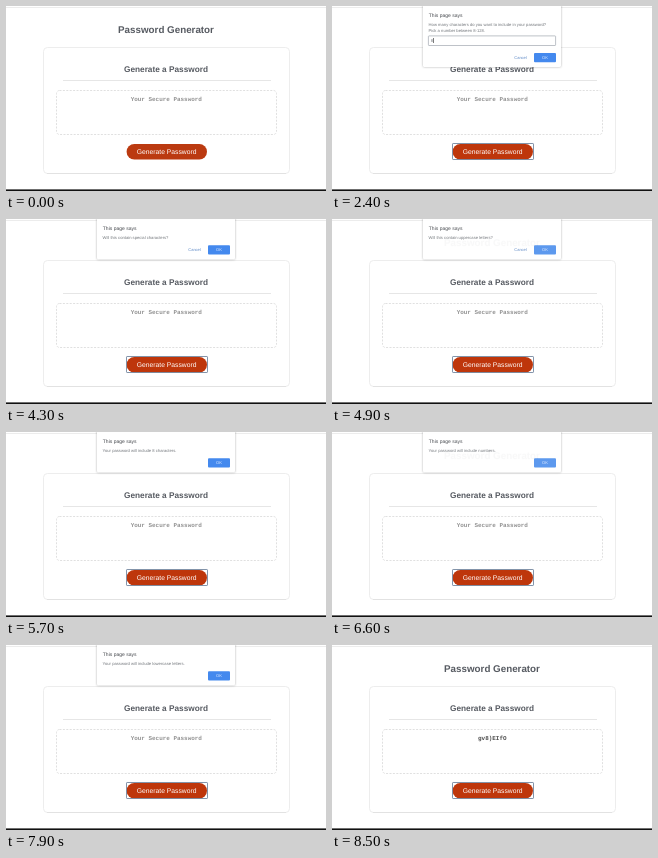
Write an HTML page that moves like this. It is 320 px wide and 185 px high and loops after 8.6 s.

```html
<!DOCTYPE html>
<html lang="en">
<head>
<meta charset="utf-8">
<title>Password Generator</title>
<style>
  html, body { margin: 0; width: 100%; height: 100%; overflow: hidden; background: #fff; }
  svg { display: block; width: 320px; height: 185px; }
  text { font-family: "Liberation Sans", Arial, sans-serif; text-rendering: geometricPrecision; }
  .mid { text-anchor: middle; }
  .head { font-weight: 700; fill: #565a61; }
  .mono { font: 700 5.95px "Liberation Mono", "Courier New", monospace; }
  .says { font-size: 5px; fill: #45484d; }
  .msg { font-size: 4.17px; fill: #73777c; }
  .btn { font-size: 4px; }
  .panel { filter: drop-shadow(0 .7px 1px rgba(0, 0, 0, .32)); }
</style>
</head>
<body>
<svg viewBox="0 0 320 185">
  <rect width="320" height="185" fill="#fff"/>
  <rect y="1" width="320" height="1" fill="#ececec"/>
  <rect y="183.4" width="320" height="1.6" fill="#111"/>

  <text class="head mid" x="160" y="27.2" font-size="9.8">Password Generator</text>
  <rect x="37.5" y="41.5" width="246" height="126" rx="4" fill="#fff" stroke="#ededed"/>
  <path d="M41 167.5H280" stroke="#e2e2e2"/>
  <text class="head mid" x="160" y="65.5" font-size="8.25">Generate a Password</text>
  <path d="M57 74.5H265" stroke="#e6e6e6"/>
  <rect x="50.5" y="84.5" width="220" height="44" rx="3" fill="#fff" stroke="#d9d9d9" stroke-width=".8" stroke-dasharray="2 1.4"/>
  <text id="field" class="mono mid" x="160.3" y="94.6"></text>

  <rect id="pill" x="120.6" y="138" width="80.4" height="15.4" rx="7.7"/>
  <text class="mid" x="160.6" y="148.1" font-size="6.75" fill="#fff">Generate Password</text>
  <rect id="ring" x="120.5" y="137.5" width="81" height="16" rx=".6" fill="none" stroke="#7487a0" stroke-width=".9"/>

  <g id="dialog">
    <rect id="panel" class="panel" x="91" y="-4" width="138" rx="1.6" fill="#fff"/>
    <text class="says" x="96.8" y="10.8">This page says</text>
    <text id="line1" class="msg" x="96.6" y="19.9"></text>
    <g id="prompt">
      <text class="msg" x="96.6" y="25.6">Pick a number between 8-128.</text>
      <rect x="96.4" y="29.9" width="127.2" height="9.6" rx=".6" fill="#fff" stroke="#a3a8b0" stroke-width=".7"/>
      <text id="typed" class="msg" x="98.8" y="36.3">8</text>
      <rect id="caret" y="32" width=".7" height="5" fill="#444"/>
    </g>
    <g id="actions">
      <text id="cancel" class="btn mid" x="188.5" y="5.9" fill="#5b87c5">Cancel</text>
      <rect id="ok" x="202" y="0" width="22" height="9.4" rx="1"/>
      <text class="btn mid" x="213" y="6.1" fill="#e4eeff">OK</text>
    </g>
  </g>
</svg>
<script>
  const LOOP = 8600, CLOSE = 8300, STEP = 100;
  const $ = id => document.getElementById(id);
  const kinds = ["numbers", "special characters", "uppercase letters", "lowercase letters"];
  const ask = kind => `Will this contain ${kind}?`;
  const tell = what => `Your password will include ${what}.`;

  // Each dialog replaces the previous one: press OK, swap, settle.
  const askAt = [2700, 4100, 4500, 4900];
  const tellAt = [5500, 6100, 6600, 7300, 7700];
  const dialogs = [
    { at: 1400 - STEP, type: "prompt", text: "How many characters do you want to include in your password?" },
    ...askAt.map((at, i) => ({ at, type: "confirm", text: ask(kinds[i]) })),
    ...tellAt.map((at, i) => ({ at, type: "alert", text: tell(i ? kinds[i - 1] : "8 characters") }))
  ];

  const show = (id, on) => $(id).setAttribute("visibility", on ? "inherit" : "hidden");
  const set = (id, name, value) => $(id).setAttribute(name, value);

  function drawDialog(t) {
    const index = dialogs.findLastIndex(d => t >= d.at + STEP);
    const open = index >= 0 && t < CLOSE + 2 * STEP;
    set("dialog", "visibility", open ? "visible" : "hidden");
    if (!open) return;

    const d = dialogs[index];
    const end = index + 1 < dialogs.length ? dialogs[index + 1].at : CLOSE;
    const pressed = t >= end;
    const entering = index > 0 && t < d.at + 2 * STEP;
    const isPrompt = d.type === "prompt";
    const opacity = t >= CLOSE + STEP ? .3 : pressed ? .96 : entering ? .85 : 1;

    set("dialog", "opacity", opacity);
    set("panel", "height", isPrompt ? 65 : 44.6);
    set("actions", "transform", `translate(0 ${isPrompt ? 46.9 : 26.2})`);
    set("ok", "fill", pressed ? "#5795ee" : "#4489ee");
    $("line1").textContent = d.text;
    show("prompt", isPrompt);
    show("cancel", d.type !== "alert");
    show("typed", isPrompt && t >= 2300);
    show("caret", isPrompt && (t < 1800 || t >= 2400));
    set("caret", "x", t < 2300 ? 98.8 : 101.3);
  }

  function draw(now) {
    const t = now % LOOP;
    const done = t >= CLOSE + 2 * STEP;
    $("field").textContent = done ? "gv8)EIfO" : "Your Secure Password";
    set("field", "fill", done ? "#4c4c4c" : "#919191");
    set("pill", "fill", t < 100 ? "#bb3a10" : "#be360b");
    show("ring", t >= 900);
    drawDialog(t);
  }

  function tick() {
    draw(performance.now());
    requestAnimationFrame(tick);
  }
  tick();
</script>
</body>
</html>
```
